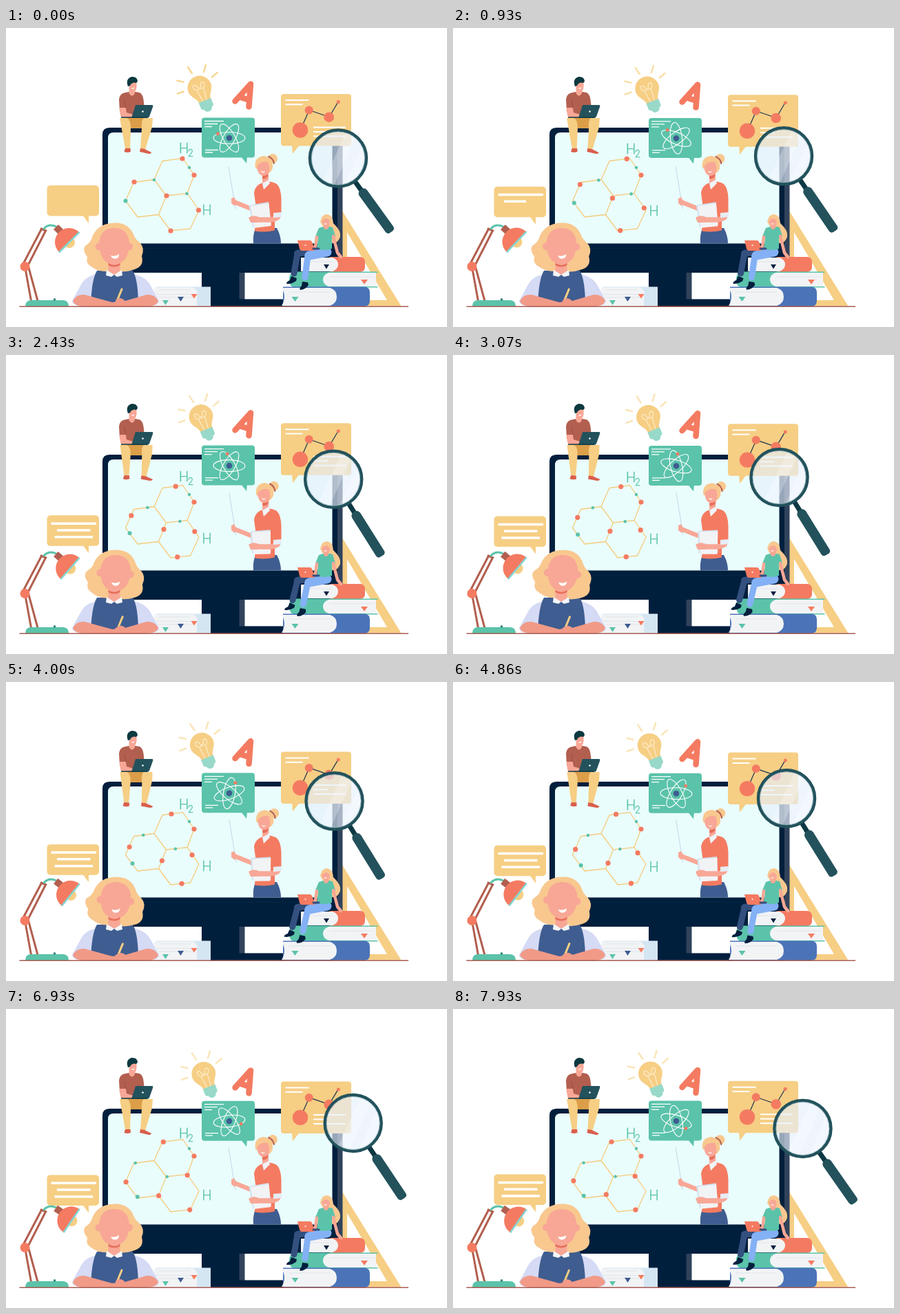
Recreate the animation shown at these times as an HTML page. Size 640x435 px, loop 8 s.

```html
<!DOCTYPE html>
<html lang="en">
<head>
<meta charset="utf-8">
<title>Online science class</title>
<style>
  html, body { margin: 0; width: 100%; height: 100%; overflow: hidden; background: #fff; }
  svg { display: block; width: 100%; height: 100%; }
  .line { fill: none; stroke-linecap: round; stroke-linejoin: round; }
  .navy { fill: #001f3d; } .slate { fill: #31435b; } .coral { fill: #f47b61; }
  .yellow { fill: #f6ce84; } .green { fill: #5bc3aa; } .skin { fill: #f8a796; }
  .blue { fill: #3f5d90; } .brown { fill: #b25f4f; } .hair { fill: #f8c88f; }
  .page { fill: #f2f3f5; } .teal { fill: #23525c; } .white { fill: #fff; }
  .arm { fill: #f19a87; }
  .note { fill: none; stroke: #fff; }
  text { font: 300 20px Roboto, sans-serif; fill: #5bc3aa; stroke: #5bc3aa; stroke-width: .35px; }
</style>
</head>
<body>
<svg viewBox="0 0 640 435">
  <defs>
    <clipPath id="lensClip"><circle r="40"/></clipPath>
  </defs>

  <!-- set square and monitor -->
  <path class="yellow" fill-rule="evenodd" d="M488 266L573.500 404.500H488ZM495 297V396H553Z"/>
  <path class="slate" d="M470 145h8.500q10 0 10 10v201h-18.500z"/>
  <path class="navy" d="M150 145H471q10 0 10 10V356H140V155q0-10 10-10z"/>
  <path fill="#eafdfd" d="M156 152H466q7.500 0 7.500 8V313.400H148V160q0-8 8-8z"/>
  <path d="M140 320.500H481" stroke="#0c2b49" stroke-width=".7"/>
  <path class="slate" d="M335 356h11.500v40h-11.500z"/>
  <path class="navy" d="M284 356h54.500v38.500h81.500v10.500H284z"/>

  <!-- molecule -->
  <path class="line" stroke="#f5cb7c" stroke-width="1.300" d="M227 193.500L256.500 189.500 273 214 263 240.500 232.500 244 215 220.500ZM215 220.500L185.500 224.500 173.500 251.500 191 275 221.500 271.500 232.500 244M263 240.500L280 265 267.500 292 239 295 221.500 271.500"/>
  <g id="atoms"></g>
  <g id="labels"><text x="251" y="181.800">H</text><text x="264" y="186.800" style="font-size:14px">2</text><text x="284.500" y="271.800">H</text></g>

  <!-- teacher -->
  <g id="pointer"><path class="line" stroke="#c9dcea" stroke-width="1.200" d="M323 202L333 263"/></g>
  <path class="blue" d="M362 291H393Q399 302 399 313.400H359Q358 301 362 291Z"/>
  <path class="coral" d="M368 227Q382 220 393 227Q399 233 399.500 248V271L390 274V294.500Q376 298 361 295.500L363 262 360 240Q361 231 368 227Z"/>
  <path class="line" stroke="#f8a796" stroke-width="6.500" d="M331 253L356 263"/>
  <path class="skin" d="M327 248l4-2 4 7-3 6-5-4z"/>
  <g id="teacherHead">
    <circle class="hair" cx="387" cy="190" r="7"/>
    <path class="skin" d="M372 208h9v15q-5 5-9 1z"/>
    <path d="M372 214q5 2 8-4l0 6q-4 5-8 3z" fill="#e76f5b"/>
    <path class="hair" d="M362 204Q359 188 374 186Q388 188 387 204Q383 213 378 211Z"/>
    <path class="skin" d="M364 201Q370 193 380 195Q387 214 373 215Q365 214 364 201Z"/>
    <path d="M381 187q7 3 8 10" class="line" stroke="#b25f4f" stroke-width="2"/>
    <path class="white" d="M369 208q4 2 7 0q-2 5-7 0z"/>
  </g>
  <path d="M372 226l9-5 2 5-9 9z" fill="#f1f4f8"/>
  <g id="papers">
    <path d="M352.500 258l28.500-5 4 33-27 4z" fill="#d3e2ef"/>
    <path class="page" d="M355 259l26.500-4 3 33-24.500 3z"/>
  </g>
  <path class="line" stroke="#f8a796" stroke-width="7.500" d="M395 274Q394 278 382 279L359 279"/>
  <path d="M388 269l12-1v7l-12 1z" fill="#e6edf5"/>
  <path class="skin" d="M352 276q6-5 15-1l-2 8-10 0z"/>

  <!-- seated man -->
  <path d="M174 131h26v15h-26z" fill="#dc9e48"/>
  <g id="legL">
    <path class="yellow" d="M165 131H176Q181 134 181 146L180 175H173Z"/>
    <path d="M173 175h7.500l.5 5q-5 2-9.500 0z" fill="#d95f4c"/>
  </g>
  <g id="legR">
    <path class="yellow" d="M200 131H213L212 144 202 177H195L197 146Q196 134 200 131Z"/>
    <path d="M195 175l6 1 10 5q0 2-4 2l-13-3z" fill="#d95f4c"/>
  </g>
  <path class="brown" d="M173 94q10-3 21 0q5 2 6 14l2 23h-30l-7-10-1-17q1-9 9-10z"/>
  <path d="M172 105l3 17" class="line" stroke="#9c4f42"/>
  <path class="skin" d="M165 116h9l1 7 10 3-1 4-16 1q-3-4-3-15zM178.500 86h8.500v9q-4 7-8.500 0z"/>
  <path class="skin" d="M178 79q5-4 11-2q2 11-2 15.500q-8 2-9-13.500z"/>
  <path d="M177 85q-4-11 5-14q8-1 9 6q-1 4-4 2.500q-5-.5-7 4.500z" fill="#0d3940"/>
  <path class="white" d="M181.500 87q3 1 5-1q-1 5-5 1z"/>
  <path class="teal" d="M188 112h24q2 0 1 3l-5 14q-1 2-4 2h-22z"/>
  <path d="M167 130h38" stroke="#123c46" stroke-width="1.500"/>
  <circle class="white" cx="198.500" cy="121.500" r="1.300"/>

  <!-- bulb and letter -->
  <g id="bulb">
    <path id="rays" class="line" stroke="#f8d792" stroke-width="2.500" d="M264 57L270 66M290 54L287 64M306.500 65L299 71.500M248.500 76.500L257.500 78.500M249 95.500L257.500 92.500"/>
    <g transform="translate(281 87) rotate(-22)">
      <path class="yellow" d="M-17.500 0A17.500 17.500 0 1 1 17.500 0C17.500 9 9 13 9 21H-9C-9 13-17.500 9-17.500 0Z"/>
      <path class="line" stroke="#fceac6" stroke-width="1.300" d="M-3 20L-5 2Q-10-1-8-6Q-3-8-2 0L2 0Q3-8 8-6Q10-1 5 2L3 20M-5 2H5"/>
      <path d="M-9.500 20H9.500V29Q9 32 6 32Q5 37 0 37Q-5 37-6 32Q-9 32-9.500 29Z" fill="#98d9c9"/>
    </g>
  </g>
  <path id="letter" class="line" stroke="#f47b61" stroke-width="8.500" d="M332.500 106.500L355 81.500 352.500 114.500M341 101L352 104.500"/>

  <!-- green board -->
  <g id="greenBoard">
    <rect class="green" x="284" y="130.500" width="77" height="58" rx="4"/>
    <path class="green" d="M341 187h9l-1 10z"/>
    <path class="note" stroke-width="1.300" d="M288 135.500h28M288 139.500h19M288 143.500h11M289 177.500h19M289 181h11"/>
    <g transform="translate(324 160)"><g id="atom">
      <g class="note" stroke-width="1.100" id="orbits"></g>
      <circle class="blue" r="4.300"/>
      <circle class="coral" cx="-16.500" cy="-6" r="2.400"/>
    </g></g>
  </g>

  <!-- yellow board -->
  <g id="yellowBoard">
    <rect class="yellow" x="399" y="96" width="102" height="75.500" rx="4"/>
    <path class="yellow" d="M415 170h11l-10 13z"/>
    <path class="note" stroke-width="2" d="M405.500 105h34M405.500 111.300h25M446 144.500h47M446 151h21M446 157.500h47"/>
    <path class="line" stroke="#1c3550" stroke-width="1.200" d="M427 149L440 119.500 469 129.500 482 107.500"/>
    <g class="coral"><circle cx="427" cy="148.500" r="11.200"/><circle cx="439.700" cy="119.500" r="6"/><circle cx="468.700" cy="129.700" r="7.300"/><circle cx="482.300" cy="107.500" r="2.500"/></g>
  </g>

  <!-- speech bubble -->
  <g id="bubble">
    <rect class="yellow" x="59.500" y="229" width="75.500" height="44.500" rx="5"/>
    <path class="yellow" d="M111 272h9v12z"/>
    <g id="speech" class="note" stroke-width="3.500"><path d="M65.500 240.900h65.500"/><path d="M74 250.700h48.500"/><path d="M70.500 260.500h55.500"/></g>
  </g>

  <!-- lamp -->
  <path class="line" stroke="#b25f4f" stroke-width="3" d="M25 343L51.500 292.500M31.500 346L57.500 295M51 292L58 295M28 350L36.500 397M33 349L46 397"/>
  <circle class="coral" cx="27.500" cy="347" r="7"/>
  <path class="line" stroke="#5bc3aa" stroke-width="3" d="M55 292Q62 284 73 289"/>
  <g id="lamp">
    <circle class="yellow" cx="92" cy="312" r="8"/>
    <path class="brown" d="M69 293l7-7 8 8-7 7z"/>
    <path class="coral" d="M77 326A20.500 20.500 0 1 1 106 297Z"/>
    <path d="M77 326.500L106.500 297" stroke="#83d6d2" stroke-width="2.500"/>
  </g>
  <path class="green" d="M28 405q0-9 9-9h45q9 0 9 9z"/>
  <path d="M69 393.500h3v3h-3z" fill="#2f7f76"/>

  <!-- low books -->
  <path fill="#d5e6f3" d="M218 376.500H297V405H218z"/>
  <path class="page" d="M215 377.500H272q6 4 6 9.500H215zM215 388H277v16.500H215z"/>
  <path d="M218 387.500H278M222 381h46M222 392h50" stroke="#dfe5ea"/>
  <path class="green" d="M227 396h9l-4.500 7z"/><path class="blue" d="M249 391h9l-4.500 7z"/><path class="coral" d="M268.500 387h9l-4.500 6.500z"/>

  <!-- student -->
  <path d="M135 358Q115 360 108 375L96 397Q96 403 108 405H210Q222 403 222 397L210 375Q202 360 181 358Z" fill="#d5daf5"/>
  <path class="blue" d="M132 353H184Q192 366 192 405H123Q124 366 132 353Z"/>
  <g id="studentHead">
    <path class="hair" d="M158 283.500Q176 283 184 298Q187 307 194 312Q202 320 197 332Q201 346 187 351Q171 357 157 353Q137 357 125 348Q115 343 118 333Q110 323 115 317Q124 311 125 304Q133 284 158 283.500Z"/>
    <circle class="skin" cx="135" cy="318" r="5.500"/><circle class="skin" cx="178.500" cy="318" r="5.500"/>
    <path class="skin" d="M157 291C172 291 179 301 179 316Q177 343 157 344Q137 343 135 316C135 301 142 291 157 291Z"/>
    <path class="white" d="M152 331q7 2 12-2q0 6-5 6.500q-5 1-7-4.500z"/>
  </g>
  <path class="skin" d="M148.500 341h17v14q-8 8-17 0z"/>
  <path d="M148.500 342q9 6 17 0v3q-9 5-17 0z" fill="#e76f5b"/>
  <path d="M146 352l11 7 11-7 1 8-8 2-4-3-4 3-8-2z" fill="#f4f6fa"/>
  <path class="arm" d="M97 397Q102 387 114 388L154 399 163 398 166 405H112Q99 404 97 397Z"/>
  <path class="arm" d="M221 397Q216 387 204 388L173 397Q163 393 158 398L166 405H206Q219 404 221 397Z"/>
  <g id="pencil"><path class="line" stroke="#f6ce84" stroke-width="3" d="M161.500 396L168 380"/><path class="arm" d="M159 396q6-6 13 0l-4 5h-8z"/></g>

  <!-- tall books -->
  <rect class="coral" x="465" y="333" width="56" height="22" rx="7"/>
  <path class="page" d="M428 334H474q8 3 8 10t-8 10H428z"/>
  <path class="green" d="M418 354.500H539.500V356H470V376H539.500V377.500H418Q411 376 411 366T418 354.500Z"/>
  <path class="page" d="M468 356H537V376H468q-8-3-8-10t8-10z"/>
  <path d="M402 376.500H521q7 1 7 8V397q0 7-7 8H402z" fill="#4b74b8"/>
  <path class="page" d="M400 378H470q10 3 10 13t-10 13H400q8-13 0-26z"/>
  <path d="M410 384h60M470 362h64M436 340h38" stroke="#dfe5ea"/>
  <path class="navy" d="M461 344h8l-4 6.500z"/><path class="coral" d="M515 366h10l-5 7z"/><path class="green" d="M414.500 391h10l-5 7z"/>

  <!-- reader on the books -->
  <path class="hair" d="M456 282Q458 271 466 271Q474 272 475 284Q487 295 485 304Q481 314 474 313Z"/>
  <g id="farLeg"><path class="line" stroke="#34507f" stroke-width="9" d="M423 328L418 357"/><path class="navy" d="M414 361l8 3-1 4q-7 5-14 4q0-3 5-5z"/></g>
  <path class="line" stroke="#34507f" stroke-width="10" d="M461 322L423 328"/>
  <g id="nearLeg"><path class="line" stroke="#84b1f5" stroke-width="9" d="M438 331L434 363"/><path class="navy" d="M430 369l8 1 1 4q-5 7-12 7q-2-2 2-6z"/></g>
  <path class="line" stroke="#84b1f5" stroke-width="13" d="M466 326L440 331"/>
  <path class="green" d="M454 291q9-4 20-1l4 13-5 3 0 15q-10 4-22 0l2-15-4-3z"/>
  <path class="line" stroke="#f8a796" stroke-width="4.500" d="M475 303L481 327 486 333M451 304L449 318 444 321"/>
  <path class="skin" d="M461 286h7v5q-4 4-7 0zM458 280q4-6 10-4q4 9-1 13q-8 0-9-9z"/>
  <path class="hair" d="M457 284q1-14 10-12q8 3 6 14q-3-8-8-9q-5 0-8 7z"/>
  <path class="white" d="M461 284q3 1 5 0q-2 4-5 0z"/>
  <path class="coral" d="M423 309h18q2 0 3 2l4 11q0 2-2 2h-17q-2 0-3-3z"/>
  <circle class="white" cx="434.500" cy="316" r="1"/>
  <path class="line" stroke="#34507f" stroke-width="3" d="M446 321h8"/>

  <path d="M19.500 405.200H584" stroke="#a75d53" stroke-width="1.500"/>

  <!-- magnifier -->
  <g id="magnifier">
    <g id="handle">
      <path d="M42-3.500H60V3.500H42z" fill="#0d3843"/>
      <path class="teal" d="M62-7H127q5 0 5 5V2q0 5-5 5H62Q56 6 56 0T62-7z"/>
    </g>
    <g clip-path="url(#lensClip)">
      <circle r="41" fill="#e6f0fc" opacity=".65"/>
      <path d="M-27 45L15-45H32L-8 45zM6 45L40-30 48-18 18 45z" fill="#fff" opacity=".25"/>
    </g>
    <circle r="41" fill="none" stroke="#23525c" stroke-width="4.500"/>
    <circle r="38.500" fill="none" stroke="#8fb0b8" stroke-width=".8"/>
  </g>
</svg>
<script>
const LOOP = 8000;
const $ = id => document.getElementById(id);
const make = (parent, tag, attrs) => {
  const el = document.createElementNS('http://www.w3.org/2000/svg', tag);
  for (const name in attrs) el.setAttribute(name, attrs[name]);
  return parent.appendChild(el);
};
const clamp = v => Math.max(0, Math.min(1, v));

// Smooth curve through [time, value] steps.
function curve(steps) {
  const slope = i => {
    const a = steps[Math.max(0, i - 1)], b = steps[Math.min(steps.length - 1, i + 1)];
    return (b[1] - a[1]) / (b[0] - a[0]);
  };
  return t => {
    let i = 0;
    while (i < steps.length - 2 && t > steps[i + 1][0]) i++;
    const [t0, v0] = steps[i], [t1, v1] = steps[i + 1];
    const d = t1 - t0, u = (t - t0) / d, w = 1 - u;
    return w * w * (1 + 2 * u) * v0 + u * u * (3 - 2 * u) * v1
      + d * u * w * (w * slope(i) - u * slope(i + 1));
  };
}

const lensX = curve([[0, 482], [930, 480], [1860, 477], [3070, 473.5], [3500, 474], [4290, 478.5],
  [4860, 484], [5790, 492.7], [6930, 503.7], [7500, 507], [8000, 507.5]]);
const lensY = curve([[0, 189.5], [1860, 183], [3070, 178], [4860, 169.3], [5790, 167], [6930, 166], [8000, 174.5]]);
const handleAngle = curve([[0, 54.2], [1860, 57.2], [3070, 58.3], [4860, 58.2], [5790, 57.3], [6930, 56.3], [8000, 55]]);

// Each atom slides from (x, y) by (dx, dy).
const atoms = [
  [256, 190, -28, 3.5, 'coral', 3.6], [273, 214, 0, 0, 'coral', 3.6], [186, 224, -12, 28, 'coral', 3.6],
  [233, 244, -11.5, 28, 'coral', 3.6], [279.5, 265, -16.5, -23.5, 'coral', 3.6], [239, 295, 28, -3, 'coral', 3.6],
  [266, 203, 0, 0, 'green', 2.3], [215, 221, -27.5, 3, 'green', 2.3],
  [173.5, 251.5, 17.5, 22, 'green', 3], [262.5, 241, -29, 3, 'green', 2.3]
].map(([x, y, dx, dy, color, r]) => ({ x, y, dx, dy, el: make($('atoms'), 'circle', { class: color, r }) }));
for (const angle of [0, 60, 120]) make($('orbits'), 'ellipse', { rx: 23, ry: 8.5, transform: `rotate(${angle})` });

const speech = [...$('speech').children];
speech.forEach(line => { line.setAttribute('pathLength', 1); line.setAttribute('stroke-dasharray', '1 2'); });

const put = (id, transform) => $(id).setAttribute('transform', transform);
const shift = (id, x, y) => put(id, `translate(${x} ${y})`);
const turn = (id, angle, x = 0, y = 0) => put(id, `rotate(${angle} ${x} ${y})`);

function draw(t) {
  const drift = t < 7000 ? t / 7000 : 1 - (t - 7000) / 12500;
  const sway = (1 - Math.cos(2 * Math.PI * t / 6900)) / 2;

  shift('bulb', 6 * drift, 7.5 * drift);
  $('rays').setAttribute('opacity', 1 - .35 * clamp(t / 1500));
  shift('letter', 0, 8 * drift);
  shift('greenBoard', 0, 3.2 * drift);
  shift('yellowBoard', 0, 9.5 * drift);
  shift('bubble', 0, 12.5 * drift);
  shift('labels', 0, 6.3 * drift);
  turn('lamp', -11 * drift, 74, 292);
  turn('atom', t * .025);

  for (const a of atoms) {
    a.el.setAttribute('cx', a.x + a.dx * drift);
    a.el.setAttribute('cy', a.y + a.dy * drift);
  }
  speech.forEach((line, i) => line.setAttribute('stroke-dashoffset', 1.001 - 1.001 * clamp((t - 100) / 500 - i)));

  turn('studentHead', 4 * sway, 157, 350);
  shift('pencil', 1.5 * sway, sway);
  turn('teacherHead', 4 * sway, 373, 222);
  turn('papers', 7 * sway, 370, 280);
  shift('pointer', sway, -1.5 * sway);
  turn('legL', 3 * sway, 172, 140);
  turn('legR', -3 * sway, 206, 140);
  turn('farLeg', 5 * sway, 423, 328);
  turn('nearLeg', 6 * sway, 438, 331);

  shift('magnifier', lensX(t), lensY(t));
  turn('handle', handleAngle(t));
}

const start = performance.now();
function tick() {
  draw((performance.now() - start) % LOOP);
  requestAnimationFrame(tick);
}
tick();
</script>
</body>
</html>
```
